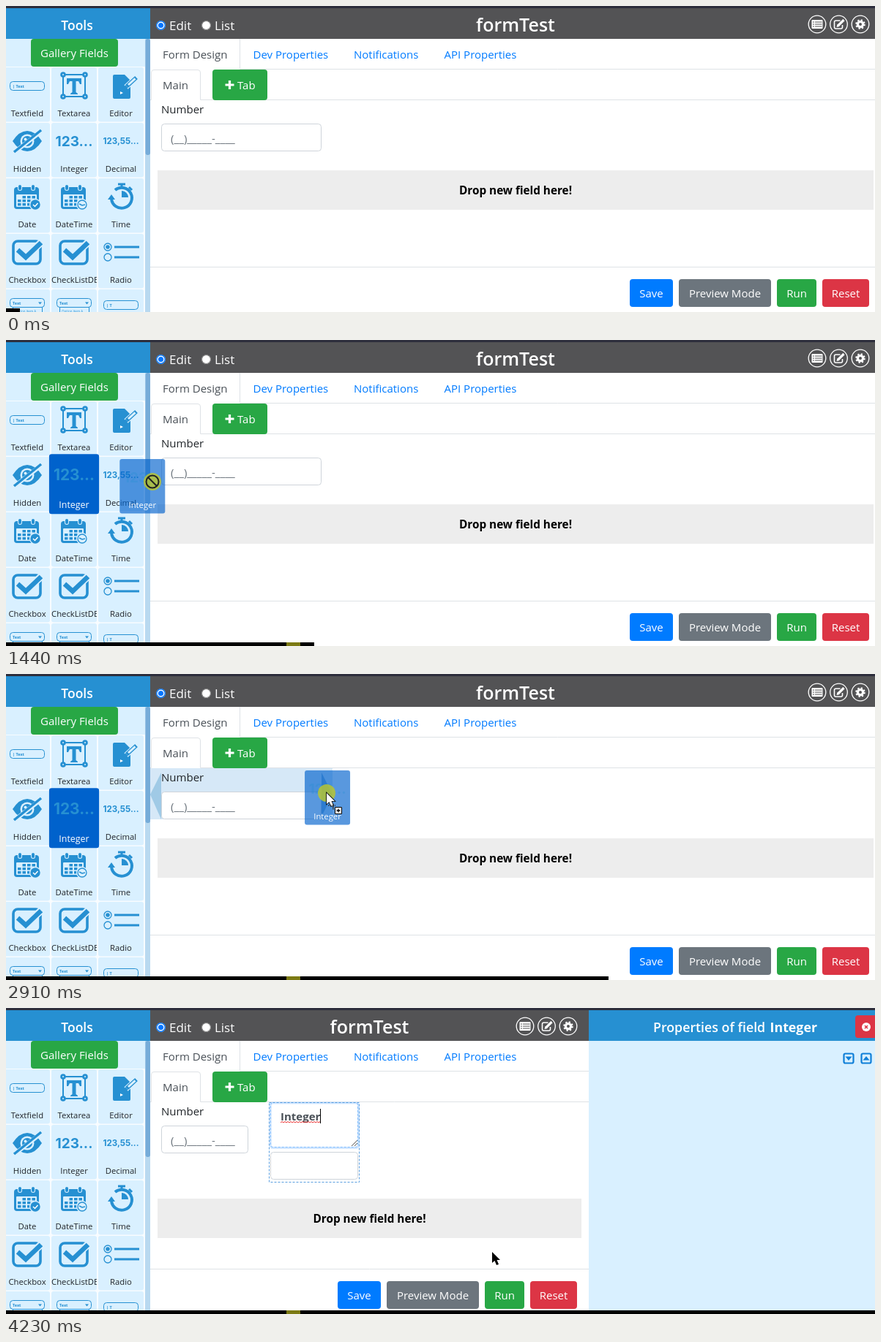
Recreate the animation shown at these times as an HTML page with a canvas. Size 1187x419 px, loop 4.3 s.

```html
<!DOCTYPE html>
<html lang="en">
<head>
<meta charset="utf-8">
<title>Form designer</title>
<style>
html, body { margin: 0; width: 100%; height: 100%; overflow: hidden; background: #fff }
canvas { display: block }
</style>
</head>
<body>
<canvas id="stage" width="1187" height="419"></canvas>
<script>
const ctx = document.getElementById('stage').getContext('2d');
const LOOP = 4300, FRAMES = 62, WIDTH = 1187;
const BLUE = '#2690d2', PALE = '#d9f0ff', GREEN = '#28a745', RED = '#dc3545', LINE = '#dee2e6', INK = '#212529';

const clamp = v => Math.max(0, Math.min(1, v));
const mix = (a, b, k) => `rgb(${a.map((v, i) => Math.round(v + (b[i] - v) * k))})`;

// ---- drawing helpers ----
function box(x, y, w, h, color, radius = 0) {
  ctx.fillStyle = color;
  ctx.beginPath();
  ctx.roundRect(x, y, w, h, radius);
  ctx.fill();
}
function outline(x, y, w, h, color, radius = 0, width = 1, dash = []) {
  ctx.strokeStyle = color;
  ctx.lineWidth = width;
  ctx.setLineDash(dash);
  ctx.beginPath();
  ctx.roundRect(x, y, w, h, radius);
  ctx.stroke();
  ctx.setLineDash([]);
}
function fill(d, color) {
  ctx.fillStyle = color;
  ctx.fill(new Path2D(d));
}
function stroke(d, color, width = 1, dash = []) {
  ctx.strokeStyle = color;
  ctx.lineWidth = width;
  ctx.setLineDash(dash);
  ctx.stroke(new Path2D(d));
  ctx.setLineDash([]);
}
function disc(x, y, r, color) {
  ctx.fillStyle = color;
  ctx.beginPath();
  ctx.arc(x, y, r, 0, 7);
  ctx.fill();
}
function ring(x, y, r, color, width = 1, dash = []) {
  ctx.strokeStyle = color;
  ctx.lineWidth = width;
  ctx.setLineDash(dash);
  ctx.beginPath();
  ctx.arc(x, y, r, 0, 2 * Math.PI);
  ctx.stroke();
  ctx.setLineDash([]);
}
function text(str, x, y, { size = 15, color = INK, weight = 400, align = 'left', family = 'Open Sans' } = {}) {
  ctx.font = `${weight} ${size}px "${family}", sans-serif`;
  ctx.fillStyle = color;
  ctx.textAlign = align;
  ctx.fillText(str, x, y);
}
function at(x, y, draw, scale = 1) {
  ctx.save();
  ctx.translate(x, y);
  ctx.scale(scale, scale);
  draw();
  ctx.restore();
}

// ---- tool icons, relative to the tile centre ----
const number = (str, size, y) => text(str, 0, y, { size, color: BLUE, weight: 700, align: 'center', family: 'Inter' });

function calendar() {
  box(-18, -25, 34, 30, BLUE, 4);
  box(-15, -15, 28, 17, PALE, 1);
  for (const x of [-10, 8]) {
    box(x - 3, -29, 6, 9, PALE, 3);
    box(x - 2, -28, 4, 7, BLUE, 2);
  }
  for (let i = 1; i < 12; i++) {
    box(-13 + (i % 4) * 6.5, -13 + Math.floor(i / 4) * 5, 4.5, 3.5, BLUE);
  }
}
function badge(mark, solid) {
  disc(11, -1, 8, PALE);
  solid ? disc(11, -1, 6.7, BLUE) : ring(11, -1, 6, BLUE, 1.3);
  stroke(mark, solid ? '#fff' : BLUE, 1.5);
}
function checkbox() {
  outline(-19, -27, 37, 31, BLUE, 6, 3.6);
  stroke('M-12 -15L-2 -6L20 -26', PALE, 10);
  stroke('M-13 -15L-2 -5L19 -25', BLUE, 6.5);
}
function field(y, label, dropdown) {
  outline(-23.5, y, 47, 12, BLUE, 4);
  text(label, -20, y + 8, { size: 5.5, color: BLUE, weight: 700 });
  if (dropdown) {
    fill(`M15 ${y + 5}h5l-2.5 3z`, BLUE);
    outline(-19.5, y + 12, 40, 20, BLUE);
    text('Option item A', -17, y + 19, { size: 4.5, color: BLUE });
  }
}

const TOOLS = [
  ['Textfield', () => field(-17.5, '| Text')],
  ['Textarea', () => {
    outline(-15, -27, 30, 30, BLUE, 0, 2);
    for (const x of [-15, 15]) for (const y of [-27, 3]) {
      disc(x, y, 3.8, BLUE);
      disc(x, y, 1, PALE);
    }
    fill('M-10 -22H10V-14H8L6 -18H2.5V-3L5 -1V0H-5V-1L-2.5 -3V-18H-6L-8 -14H-10Z', BLUE);
  }],
  ['Editor', () => {
    fill('M-9 -27H5L13 -19V4Q13 6 11 6H-9Q-11 6 -11 4V-25Q-11 -27 -9 -27Z', BLUE);
    stroke('M7 -10L21 -23', PALE, 7.5);
    stroke('M8 -11L21 -23', BLUE, 5.5);
    stroke('M10 -13L19.5 -21.6', PALE, 3);
    fill('M4 -7L6 -13L10 -9Z', BLUE);
    fill('M-1 -4L3 -2L-1 0Z', '#fff');
  }],
  ['Hidden', () => {
    fill('M-20 -12Q-11 -26 0 -26Q11 -26 20 -12Q11 2 0 2Q-11 2 -20 -12Z', BLUE);
    disc(0, -12, 9.5, PALE);
    disc(0, -12, 7, BLUE);
    disc(-2.5, -14.5, 2, PALE);
    stroke('M-16 2L20 -26', PALE, 6);
    stroke('M-18 3L19 -27', BLUE, 3.5);
  }],
  ['Integer', () => number('123...', 19, -5)],
  ['Decimal', () => number('123,55...', 11.6, -8)],
  ['Date', () => { calendar(); badge('M8 -1L10.5 1.5L14.5 -3', true); }],
  ['DateTime', () => { calendar(); badge('M7 -2L11 0L15 -1', false); }],
  ['Time', () => {
    stroke('M-8 -21A14 14 0 1 1 -13 -9', BLUE, 4);
    fill('M-18 -8L-8 -8L-13 -15Z', BLUE);
    fill('M1 -11V-20A9 9 0 0 1 10 -11Z', BLUE);
    stroke('M-4 -29H6M1 -29V-24M11 -25L15 -21', BLUE, 3);
  }],
  ['Checkbox', checkbox],
  ['CheckListDB', checkbox],
  ['Radio', () => {
    for (const y of [-19, -5]) {
      ring(-18, y, 5, BLUE, 1.3);
      stroke(`M-9 ${y}H25`, BLUE, 3.2);
    }
    disc(-18, -19, 2.8, BLUE);
  }],
  ['', () => field(-24.5, 'Text', true)],
  ['', () => field(-24.5, 'Text', true)],
  ['', () => field(-21.5, '| T')],
];

function tile([label, icon], x, y, { level = 0, scale = 1, ghostly = false } = {}) {
  at(x, y, () => {
    if (ghostly) ctx.globalAlpha = 0.65;
    box(-31, -37, 62, 74.5, mix([217, 240, 255], [0, 98, 204], level), 3);
    ctx.beginPath();
    ctx.rect(-31, -37, 62, 74.5);
    ctx.clip();
    if (ghostly) ctx.globalAlpha = 0.3;
    icon();
    ctx.globalAlpha = 1;
    const long = label.length > 10;
    text(label, long ? -31 : 0, 30, {
      size: 11.3, align: long ? 'left' : 'center',
      color: mix([33, 37, 41], [255, 255, 255], clamp(level * 2.5)),
    });
  }, scale);
}
const tileX = i => 29 + 64 * (i % 3);
const tileY = i => 121 + 76 * Math.floor(i / 3);
const INTEGER = 4, DECIMAL = 5;

// ---- page parts ----
function tools(f) {
  box(0, 3, 197, 42, BLUE);
  text('Tools', 97, 33, { size: 17.5, color: '#fff', weight: 600, align: 'center' });
  box(0, 45, 197, 374, PALE);
  box(0, 83, 190, 336, '#f8fcff');
  box(34, 45, 119, 38, GREEN, 4);
  text('Gallery Fields', 93.5, 70, { color: '#fff', align: 'center' });
  box(190, 45, 7, 374, '#b9d9f0');
  box(190.5, 45, 6.5, 159, '#76acd9', 3);

  const hover = {
    [DECIMAL]: { level: clamp(Math.min((f - 5.5) / 2, (10.8 - f) / 2.7)), scale: f >= 6 && f < 9 ? 1.1 : 1 },
    [INTEGER]: { level: f < 48 ? clamp((f - 9.9) / 3) : clamp((50.5 - f) / 2.5), scale: f >= 9 && f < 48 ? 1.1 : 1 },
  };
  const raised = i => hover[i]?.scale > 1;
  const order = TOOLS.map((_, i) => i).sort((a, b) => raised(a) - raised(b));
  for (const i of order) tile(TOOLS[i], tileX(i), tileY(i), hover[i]);
}

function header(right, inner, center) {
  box(197, 3, right - 197, 42, '#535355');
  disc(211.5, 26.5, 6.3, '#fff');
  ring(211.5, 26.5, 5.7, '#0075ff', 1.4);
  disc(211.5, 26.5, 3.6, '#0075ff');
  text('Edit', 223, 33, { size: 17, color: '#fff' });
  disc(273.5, 26.5, 6.3, '#fff');
  ring(273.5, 26.5, 5.9, '#777', 1);
  text('List', 285, 33, { size: 17, color: '#fff' });
  text('formTest', center, 35, { size: 25, color: '#fff', weight: 600, align: 'center' });

  for (const x of [79, 49.5, 20]) ring(inner - x, 25, 11.8, '#fff', 1.3);
  at(inner - 79, 25, () => {
    box(-7.5, -6, 15, 12, '#fff', 1);
    for (const y of [-3, 0, 3]) stroke(`M-6 ${y}H-4M-3 ${y}H6.5`, '#535355', 1);
  });
  at(inner - 49.5, 25, () => {
    stroke('M2 -5H-4Q-6 -5 -6 -3V4Q-6 6 -4 6H3Q5 6 5 4V1', '#fff', 1.6);
    stroke('M-1 2L7 -6', '#fff', 3.2);
    fill('M-3 4L-2 0L1 3Z', '#fff');
  });
  at(inner - 20, 25, () => {
    ring(0, 0, 3.6, '#fff', 3.2);
    ring(0, 0, 5.8, '#fff', 2, [2.278, 2.278]);
  });
}

function tabs(right) {
  stroke(`M319.5 45V86.5H${right}M197 128.5H198.5V91Q198.5 87.5 202 87.5H262Q265.5 87.5 265.5 91V128.5H${right}`, LINE);
  text('Form Design', 214, 72, { color: '#495057' });
  [['Dev Properties', 337.5], ['Notifications', 475], ['API Properties', 598.5]]
    .forEach(([label, x]) => text(label, x, 72, { color: '#007bff' }));
  text('Main', 214, 114, { color: '#495057' });
  box(282, 87, 75, 42, GREEN, 4);
  stroke('M299.5 108H311.5M305.5 102V114', '#fff', 3.2);
  text('Tab', 316, 114, { color: '#fff' });
}

function dropTargetHint() {
  box(197, 129, 249, 70, '#d6e8f7');
  fill('M212 135L197 165L212 199Z', '#a0cae6');
  fill('M431 135L446 165L431 195Z', '#7eb0d8');
}

function form(right, inner, center, added, hinted) {
  if (hinted) dropTargetHint();
  text('Number', 212, 147);
  const inputWidth = added ? 118 : 218;
  box(212.5, 161.5, inputWidth, 37, '#fff', 4);
  outline(212.5, 161.5, inputWidth, 37, '#ced4da', 4);
  text('(__)_____-____', 225, 187, { color: '#6c757d' });

  const y = added ? 261 : 225;
  box(207, y, inner - 209, 54, '#ededed');
  text('Drop new field here!', center, y + 33, { size: 15.3, color: '#000', weight: 700, align: 'center' });

  stroke(`M197 357.5H${right}`, LINE);
  [['Save', 335, 59, '#007bff'], ['Preview Mode', 268, 126, '#6c757d'], ['Run', 134, 54, GREEN], ['Reset', 72, 64, RED]]
    .forEach(([label, offset, w, color]) => {
      const x = inner - offset;
      box(x, 374, w, 38, color, 4);
      text(label, x + w / 2, 399, { color: '#fff', align: 'center' });
    });
}

function newField(hovered) {
  outline(361.5, 197.5, 119, 37, '#ced4da', 4);
  if (!hovered) outline(361, 130, 120.5, 61.5, '#d0e6ff', 4, 3);
  outline(361.5, 129.5, 119, 61, hovered ? '#000' : '#80bdff', 3, 1, [3, 2]);
  outline(359.5, 129.5, 123, 109, '#5a9fe0', 0, 1, [3, 2]);
  text('Integer', 375, 154, { color: '#495057', weight: 700 });
  let squiggle = 'M375 157';
  for (let i = 0; i < 27; i++) squiggle += `l2 ${i % 2 ? 1.5 : -1.5}`;
  stroke(squiggle, '#e33', 1);
  stroke('M429.5 138V158', '#000');
  stroke('M472 189L480 181M476 189L480 185', '#555');
}

function properties() {
  box(796, 3, 391, 42, BLUE);
  box(796, 45, 391, 374, PALE);
  text('Properties of field', 884, 33, { size: 17.8, color: '#fff', weight: 600 });
  text('Integer', 1108, 33, { size: 17.8, color: '#fff', weight: 700, align: 'right' });
  box(1160, 10, 31, 31, RED, 4);
  disc(1175, 26, 6, '#fff');
  stroke('M1173 24l4 4m0 -4l-4 4', RED, 1.6);
  for (const [x, dir] of [[1151, 1], [1175, -1]]) {
    outline(x - 6.5, 62.5, 13, 13, '#0f7fd8', 2, 2.2);
    fill(`M${x - 4.5} ${69 - 2.5 * dir}h9l-4.5 ${5.5 * dir}z`, '#0f7fd8');
  }
}

// ---- pointer: [frame, x, y] ----
const PATH = [
  [1, 1052, 402], [2, 840, 372], [3, 618, 340], [4, 420, 308], [5, 258, 270], [6, 180, 226], [7, 135, 202], [8, 104, 192],
  [10, 101, 190], [20, 102, 194], [21, 200, 194], [24, 275, 196], [25, 302, 190], [28, 390, 172], [31, 436, 164],
  [33, 441, 163], [42, 438, 163], [48, 438, 163], [49, 470, 190], [50, 530, 225], [52, 617, 262], [54, 652, 310], [56, 664, 334], [61, 664, 334],
];
function pointer(f) {
  const i = Math.max(1, PATH.findIndex(p => p[0] >= f));
  const [f0, x0, y0] = PATH[i - 1], [f1, x1, y1] = PATH[i];
  const k = clamp((f - f0) / (f1 - f0));
  return [x0 + (x1 - x0) * k, y0 + (y1 - y0) * k];
}

const ARROW = 'M0 0V15L3.5 12L6 18L9 17L6.5 11H11Z';
const HAND = 'M0 0c2 0 2 1 2 2v5l5 1c3 1 3 2 3 4l-1 4-2 3v2h-8v-2l-5-6c-1-2 1-3 2-2l2 2V2c0-1 0-2 2-2z';
function shape(d, inside, edge) {
  stroke(d, edge, 1.6);
  fill(d, inside);
}
function cursor(f) {
  if (f < 1) return;
  const held = f >= 20 && f < 44;
  const [x, y] = pointer(f);
  if (held) disc(x, y, 12, 'rgba(190,200,40,.8)');
  at(x, y, () => {
    if (f < 6 || f >= 49) shape(ARROW, '#000', '#fff');
    else if (!held || f === 20) shape(HAND, '#000', '#fff');
    else if (f < 25) {
      ring(0, 0, 8.5, '#222', 2);
      stroke('M-6 -6L6 6', '#222', 2);
    } else {
      shape(ARROW, '#fff', '#000');
      stroke('M2 17H12M8 20H12M9 15V24', '#333', 1.5, [1.5, 1.5]);
      box(11, 19, 10, 10, '#fff');
      outline(11.5, 19.5, 9, 9, '#000');
      stroke('M13.5 24H18.5M16 21.5V26.5', '#000', 1.3);
    }
  });
}

// The dragged copy trails slightly behind the pointer.
function ghost(f) {
  const [x, y] = pointer(f - 0.15);
  tile(TOOLS[INTEGER], x + 1, y + 6, { level: 1, ghostly: true });
}

function progress(f) {
  const step = WIDTH / FRAMES;
  box(0, 414, Math.round((f + 1) * step), 5, '#000');
  if (f >= 20) box(383, 414, 19, 5, '#7c7a14');
}

function draw(f) {
  const added = f >= 44;
  const right = added ? 796 : WIDTH;
  const inner = added ? right - 8 : right;
  const center = added ? 496.5 : 696;
  box(0, 0, WIDTH, 419, '#fff');
  header(right, inner, center);
  tabs(right);
  form(right, inner, center, added, f >= 25 && !added);
  if (added) {
    newField(f < 50);
    properties();
  }
  tools(f);
  box(0, 0, WIDTH, 3, '#2d2e3c');
  if (f >= 21 && !added) ghost(f);
  cursor(f);
  progress(f);
}

// Ticks last 70 ms, except two shorter ones.
function frameAt(t) {
  const skew = t < 250 ? 0 : t < 3100 ? 30 : 40;
  return Math.min(FRAMES - 1, Math.floor((t + skew) / 70));
}
function tick() {
  draw(frameAt(performance.now() % LOOP));
  requestAnimationFrame(tick);
}
tick();
</script>
</body>
</html>
```
